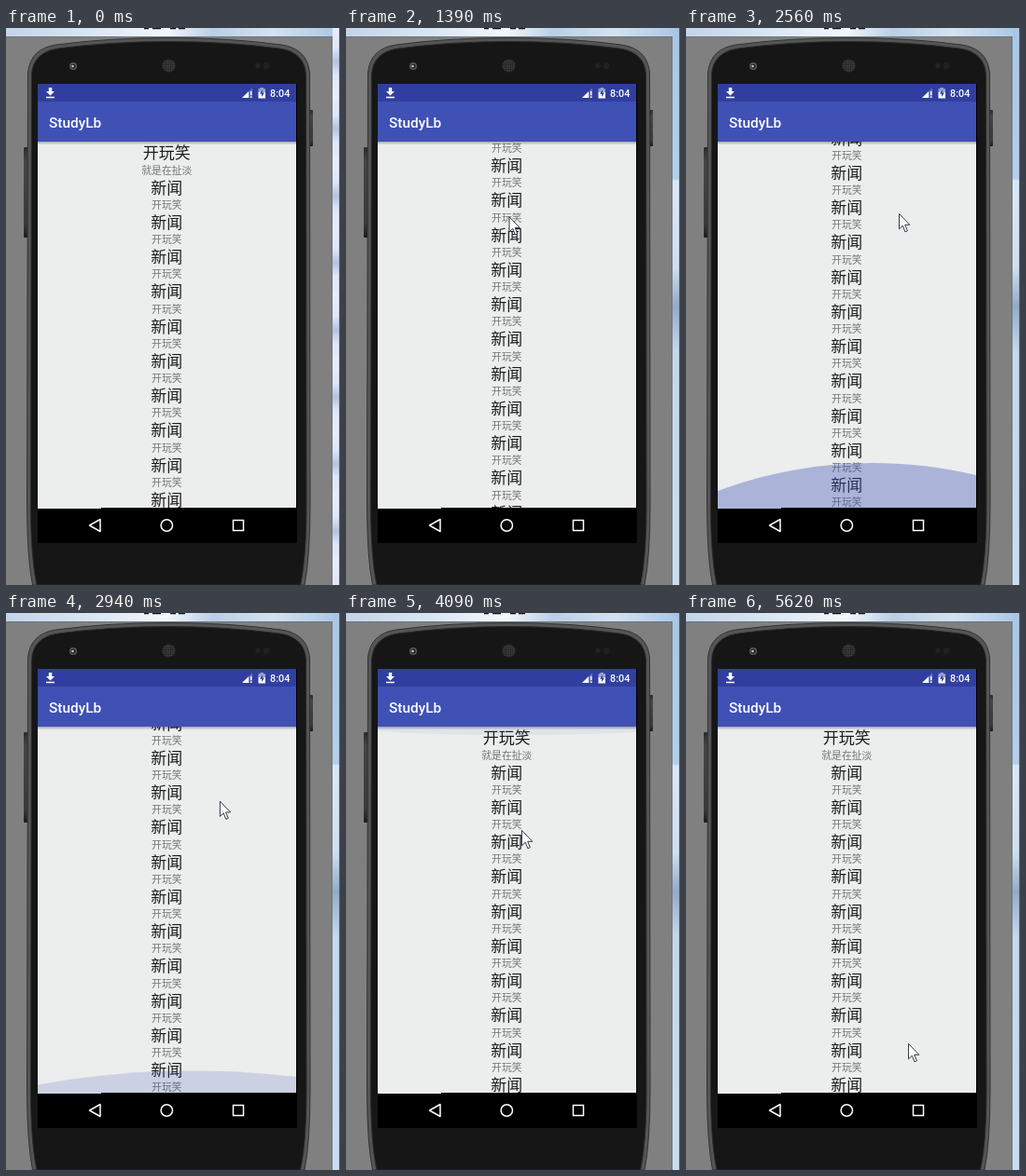
Write an HTML page that moves like this. It is 358 px wide and 598 px high and loops after 5.77 s.

```html
<!DOCTYPE html>
<html lang="zh">
<head>
<meta charset="utf-8">
<style>
  html, body { margin: 0; width: 100%; height: 100%; overflow: hidden; background: #808080; }
  svg { display: block; width: 358px; height: 598px; }
  .title { font: 17px "Noto Sans CJK SC", "Noto Sans CJK", sans-serif; fill: #1c1d1d; text-anchor: middle; }
  .sub { font: 10.8px "Noto Sans CJK SC", "Noto Sans CJK", sans-serif; fill: #747575; text-anchor: middle; }
  .ui { font-family: Roboto, sans-serif; font-weight: 500; fill: #fff; }
</style>
</head>
<body>
<svg viewBox="0 0 358 598">
  <defs>
    <linearGradient id="top">
      <stop offset="0" stop-color="#c3d5ea"/><stop offset=".25" stop-color="#d9e5f2"/>
      <stop offset=".48" stop-color="#f3f7fb"/><stop offset=".62" stop-color="#b9cfe7"/>
      <stop offset=".8" stop-color="#d3e2f1"/><stop offset="1" stop-color="#a9c6e6"/>
    </linearGradient>
    <linearGradient id="side" x2="0" y2="1">
      <stop offset="0" stop-color="#a9c6e6"/><stop offset=".27" stop-color="#b3cfeb"/>
      <stop offset=".275" stop-color="#d9e8f6"/><stop offset=".43" stop-color="#cfdfef"/>
      <stop offset=".5" stop-color="#93abc8"/><stop offset=".58" stop-color="#c4d8ec"/>
      <stop offset="1" stop-color="#c9dcf0"/>
    </linearGradient>
    <linearGradient id="mottle" x2="0" y2="36" gradientUnits="userSpaceOnUse" spreadMethod="reflect">
      <stop offset="0" stop-color="#e9ecfb"/><stop offset=".6" stop-color="#dfe6f8"/>
      <stop offset="1" stop-color="#b4c2e2"/>
    </linearGradient>
    <linearGradient id="shade" x2="0" y2="1">
      <stop offset="0" stop-color="#000" stop-opacity=".3"/><stop offset="1" stop-color="#000" stop-opacity="0"/>
    </linearGradient>
    <linearGradient id="key" x2="0" y2="1">
      <stop offset="0" stop-color="#2b2b2b"/><stop offset=".15" stop-color="#454545"/>
      <stop offset=".85" stop-color="#3a3a3a"/><stop offset="1" stop-color="#1b1b1b"/>
    </linearGradient>
    <pattern id="mesh" width="2.4" height="2.4" patternUnits="userSpaceOnUse">
      <rect width="2.4" height="2.4" fill="#3c3c3c"/><circle cx="1.2" cy="1.2" r=".75" fill="#151515"/>
    </pattern>
    <clipPath id="view"><rect x="34" y="122" width="277" height="394"/></clipPath>
  </defs>

  <!-- desktop -->
  <rect width="358" height="10" fill="url(#top)"/>
  <rect x="350" width="8" height="598" fill="url(#side)"/>
  <rect id="pale" x="350" width="8" height="598" fill="url(#mottle)"/>
  <path d="M148 0h5m4 0h9m10 0h6m3 0h7" stroke="#111" stroke-width="2.5"/>
  <rect y="9" width="350" height="589" fill="#808080"/>
  <path d="M0 9.5H349.5V598" fill="none" stroke="#6d747c"/>
  <path d="M357.5 0V598" stroke="#59636f"/>

  <!-- phone -->
  <rect x="19" y="128" width="5" height="97" rx="1" fill="url(#key)"/>
  <rect x="324" y="88" width="5" height="39" rx="1" fill="url(#key)"/>
  <path d="M28.5 598Q22.500 568 22.500 510L23.500 48Q26 22 54 18Q110 10.500 174.500 10.500Q239 10.500 295 18Q323 22 325.500 48L326 510Q326 568 320 598Z" fill="#555" stroke="#333"/>
  <path d="M33 598Q26.500 568 26.500 510L27.500 50Q29 26 56 22Q112 14.500 174.500 14.500Q237 14.500 293 22Q320 26 321.500 50L322 510Q322 568 315.500 598Z" fill="#161616" stroke="#292929"/>
  <circle cx="72" cy="41" r="4" fill="#5a5a5a"/><circle cx="72" cy="41" r="2.600" fill="#222"/>
  <circle cx="71.500" cy="41" r="1.300" fill="#ccc"/>
  <circle cx="174.500" cy="40.500" r="7" fill="url(#mesh)"/>
  <circle cx="270" cy="40.500" r="2.800" fill="#232323"/><circle cx="279" cy="40.500" r="3.500" fill="#202020"/>

  <!-- screen -->
  <rect x="34" y="60" width="278" height="493" fill="#000"/>
  <rect x="34" y="122" width="277" height="394" fill="#eceeed"/>
  <g clip-path="url(#view)">
    <g id="list"></g>
    <ellipse id="glow" rx="416" fill="#3f51b5"/>
  </g>
  <path d="M102 515.500H311" stroke="#000"/>
  <rect x="34" y="122" width="277" height="3.500" fill="url(#shade)"/>
  <rect x="34" y="60" width="277" height="19" fill="#303f9f"/>
  <rect x="34" y="79" width="277" height="43" fill="#3f51b5"/>
  <text class="ui" x="46" y="106.500" font-size="15.400">StudyLb</text>
  <text class="ui" x="283" y="73.700" font-size="10.800">8:04</text>
  <path d="M45.800 64h3.400v4h2.800l-4.500 4.600l-4.500-4.600h2.800zM43 73.800h9v1.400h-9z" fill="#fff"/>
  <path d="M253 75L264 64.500V75Z" fill="#6a76bb"/><path d="M253 75L260 68.300V75Z" fill="#fff"/>
  <path d="M262.800 68v4m0 1.500v1.500" stroke="#fff" stroke-width="1.300"/>
  <path d="M270.500 65.300h2v-1.300h3.500v1.300h2V69h-7.500z" fill="#99a1d0"/>
  <path d="M270.500 69h7.500V75.500h-7.500z" fill="#fff"/>
  <path d="M275 66.500l-3 4.300h2v3.200l3-4.500h-2z" fill="#303f9f"/>
  <g fill="none" stroke="#fff" stroke-width="1.500">
    <path d="M101 527.500V540.500L89.500 534Z" stroke-linejoin="round"/>
    <circle cx="172.300" cy="534" r="6.200"/><rect x="243.500" y="528.500" width="11" height="11"/>
  </g>

  <path id="cursor" d="M.5 .5V16.800L4.300 13.200L6.900 19.800L9.400 18.700L6.700 12.300H11.800Z" fill="#fff" stroke="#20243c" stroke-width=".9"/>
</svg>
<script>
// All times below are counted in screen refreshes of STEP ms.
const LOOP = 5770, STEP = 75.5;
const PITCH = 37.25, ROWS = 21, MID = 172.3, TOP = 122, BOTTOM = 516;
const END = 388.25;
const $ = id => document.getElementById(id);

// time, x, y: turning points of the mouse
const pointer = [
  [1, 275, 371], [8, 181, 488], [10, 181, 488], [13, 178, 320], [22, 172, 118], [26, 190, 69],
  [30, 240, 512], [33, 228, 199], [44, 230, 205], [49, 246, 519], [54, 188, 233],
  [62, 235, 531], [67, 247, 487], [73, 238, 462]
];
// time, list offset
const scroll = [[10, 0], [13, 174.25], [22, 363], [31, END], [45, END], [46, END - 4], [49, 0]];
const pulls = [
  { from: 30, to: 42, atTop: false },
  { from: 48, to: 55.5, atTop: true },
  { from: 57, to: 67, atTop: true }
];

const smooth = p => p * p * (3 - 2 * p);

function along(points, t) {
  const next = points.findIndex(point => point[0] > t);
  if (next < 1) return points.at(next).slice(1);
  const a = points[next - 1], b = points[next];
  const p = smooth((t - a[0]) / (b[0] - a[0]));
  return a.slice(1).map((v, i) => v + (b[i + 1] - v) * p);
}

function set(id, attrs) {
  for (const name in attrs) $(id).setAttribute(name, attrs[name]);
}

function addText(cls, y, text) {
  const el = document.createElementNS('http://www.w3.org/2000/svg', 'text');
  el.setAttribute('class', cls);
  el.setAttribute('x', MID);
  el.setAttribute('y', y);
  el.textContent = text;
  $('list').append(el);
}

for (let i = 0; i < ROWS; i++) {
  addText('title', 140.4 + i * PITCH, i ? '新闻' : '开玩笑');
  addText('sub', 156.6 + i * PITCH, i ? '开玩笑' : '就是在扯淡');
}

// Overscroll glow: quick rise, slow retreat, leaning towards the mouse
function drawGlow(t, x) {
  const pull = pulls.find(({ from, to }) => t >= from && t < to);
  const level = pull ? Math.min(1, (t - pull.from) / 3, (pull.to - t) / 8) : 0;
  const ry = 362 * level, depth = 49 * level;
  set('glow', {
    cx: MID + (x - MID) / 2,
    cy: pull?.atTop ? TOP + depth - ry : BOTTOM - depth + ry,
    ry,
    opacity: .38 * level
  });
}

function draw(t) {
  const [x, y] = along(pointer, t), [offset] = along(scroll, t);
  const hidden = t < 1 || (t >= 45 && t < 47);
  set('cursor', { transform: `translate(${x} ${y})`, opacity: hidden ? 0 : 1 });
  set('list', { transform: `translate(0 ${-offset})` });
  set('pale', { opacity: t < 9 ? 1 : 0 });
  drawGlow(t, x);
}

const start = performance.now();
function frame() {
  draw(Math.floor((performance.now() - start) % LOOP / STEP));
  requestAnimationFrame(frame);
}
frame();
</script>
</body>
</html>
```
